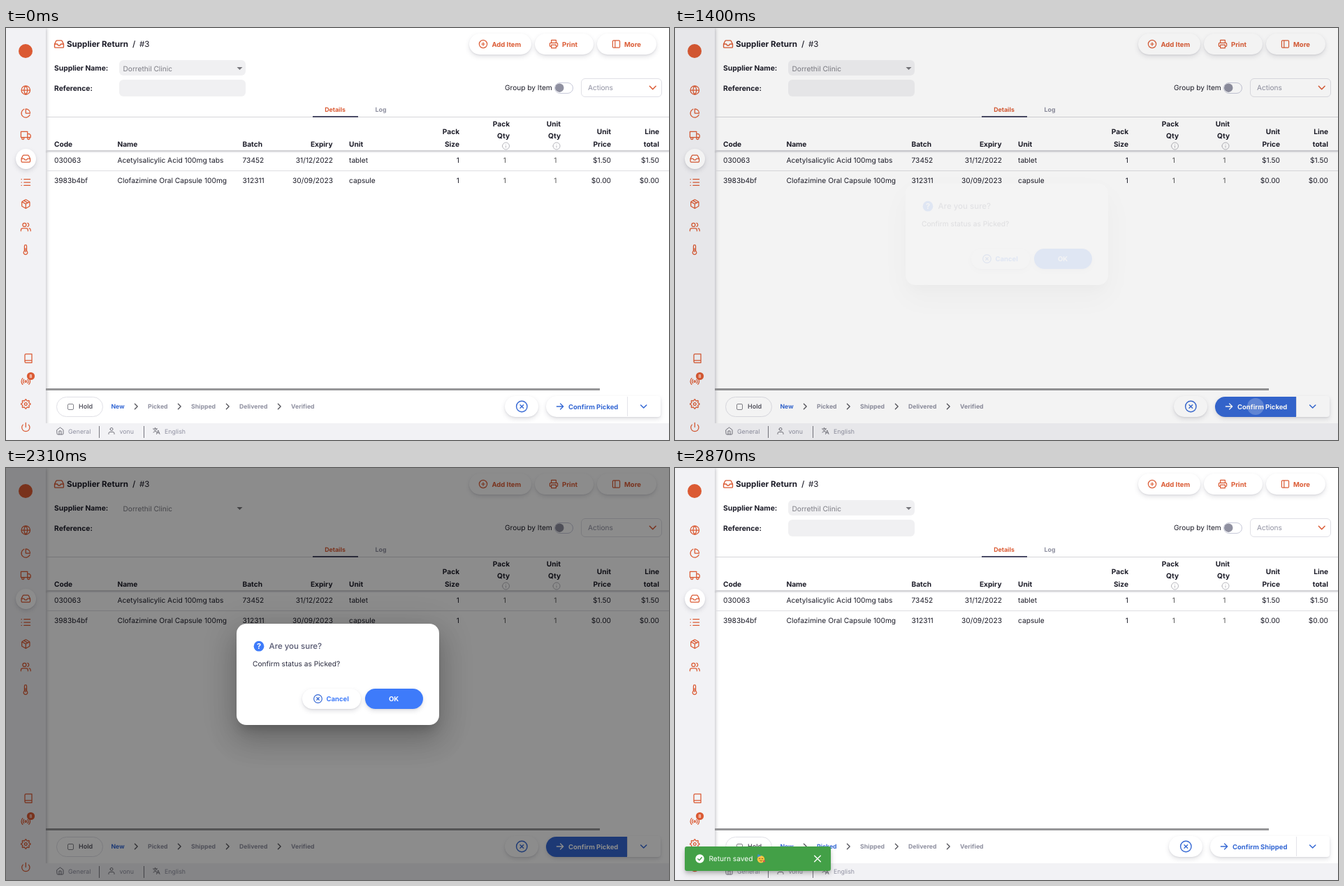
An HTML page that plays this animation: 949x590 px, repeating every 3430 ms.

```html
<!DOCTYPE html>
<html lang="en">
<head>
<meta charset="utf-8">
<title>Supplier Return</title>
<style>
  html, body { margin: 0; width: 100%; height: 100%; overflow: hidden; background: #fff; }
  #stage { position: relative; width: 949px; height: 590px; overflow: hidden; }
  .layer, .layer > svg { position: absolute; left: 0; top: 0; width: 949px; height: 590px; }
  .layer div { position: absolute; box-sizing: border-box; }
  text { font-family: Inter, "Open Sans", sans-serif; fill: currentColor; text-rendering: geometricPrecision; white-space: pre; }
  .icon { fill: none; stroke: currentColor; stroke-linecap: round; stroke-linejoin: round; }
  .pill { background: #fff; border-radius: 15px; box-shadow: 0 1px 2px rgba(40,41,61,.08), 0 3px 6px rgba(96,97,112,.18); }
  .paper { background: #fff; border-radius: 14px; box-shadow: 0 11px 15px -7px rgba(0,0,0,.2), 0 24px 38px 3px rgba(0,0,0,.14), 0 9px 46px 8px rgba(0,0,0,.12); }
  .field { background: #f0f0f2; border-radius: 6px; }
  .fill { background: #3568d4; overflow: hidden; }
  .ripple { border-radius: 50%; background: rgba(255,255,255,.24); }
  .toast { background: #43a047; border-radius: 3px; box-shadow: 0 3px 5px -1px rgba(0,0,0,.2), 0 5px 9px rgba(0,0,0,.14); }
</style>
</head>
<body>
<div id="stage"></div>
<script>
const ORANGE = '#db5a33', BLUE = '#3568d4', BRIGHT = '#3e7bfa', GREY = '#8f90a0', INK = '#1c1c28';
const LOOP = 3430, STEP = 70;
const stage = document.getElementById('stage');

const ring = (x, y, r) => `M${x - r} ${y}a${r} ${r} 0 1 0 ${2 * r} 0a${r} ${r} 0 1 0 ${-2 * r} 0`;

function gear() {
  const pts = [];
  for (let i = 0; i < 32; i++) {
    const a = (i - .5) * Math.PI / 16, r = i % 4 < 2 ? 10.6 : 8;
    pts.push((12 + r * Math.sin(a)).toFixed(2) + ' ' + (12 - r * Math.cos(a)).toFixed(2));
  }
  return 'M' + pts.join('L') + 'Z' + ring(12, 12, 3);
}

const ICONS = {
  globe: ring(12, 12, 10) + 'M2 12h20M12 2a15.3 15.3 0 0 1 4 10 15.3 15.3 0 0 1-4 10 15.3 15.3 0 0 1-4-10 15.3 15.3 0 0 1 4-10z',
  pie: 'M21.2 15.9A10 10 0 1 1 8 2.8M22 12A10 10 0 0 0 12 2v10z',
  truck: 'M1 3h15v13H1zM16 8h4l3 3v5h-7z' + ring(5.5, 18.5, 2.5) + ring(18.5, 18.5, 2.5),
  inbox: 'M22 12h-6l-2 3h-4l-2-3H2M5.5 5.1L2 12v6a2 2 0 0 0 2 2h16a2 2 0 0 0 2-2v-6l-3.5-6.9A2 2 0 0 0 16.8 4H7.2a2 2 0 0 0-1.7 1.1z',
  list: 'M8 5h14M8 12h14M8 19h14M2 5h.5M2 12h.5M2 19h.5',
  box: 'M16.5 9.4l-9-5.2M21 16V8a2 2 0 0 0-1-1.7l-7-4a2 2 0 0 0-2 0l-7 4A2 2 0 0 0 3 8v8a2 2 0 0 0 1 1.7l7 4a2 2 0 0 0 2 0l7-4a2 2 0 0 0 1-1.7zM3.3 7l8.7 5 8.7-5M12 22V12',
  users: 'M17 21v-2a4 4 0 0 0-4-4H5a4 4 0 0 0-4 4v2M23 21v-2a4 4 0 0 0-3-3.9M16 3.1a4 4 0 0 1 0 7.8' + ring(9, 7, 4),
  thermo: 'M14 14.8V3.5a2.5 2.5 0 0 0-5 0v11.3a4.5 4.5 0 1 0 5 0zM11.5 9v8',
  book: 'M4 19.5A2.5 2.5 0 0 1 6.5 17H20M6.5 2H20v20H6.5A2.5 2.5 0 0 1 4 19.5v-15A2.5 2.5 0 0 1 6.5 2z',
  radio: ring(12, 12, 2) + 'M16.2 7.8a6 6 0 0 1 0 8.5M7.8 16.2a6 6 0 0 1 0-8.5M19.1 4.9a10 10 0 0 1 0 14.1M4.9 19.1a10 10 0 0 1 0-14.1',
  gear: gear(),
  power: 'M18.4 6.6a9 9 0 1 1-12.7 0M12 2v10',
  plus: ring(12, 12, 10) + 'M12 8v8M8 12h8',
  printer: 'M6 9V2h12v7M6 18H4a2 2 0 0 1-2-2v-5a2 2 0 0 1 2-2h16a2 2 0 0 1 2 2v5a2 2 0 0 1-2 2h-2M6 14h12v8H6z',
  panel: 'M5 3h14a2 2 0 0 1 2 2v14a2 2 0 0 1-2 2H5a2 2 0 0 1-2-2V5a2 2 0 0 1 2-2zM9 3v18',
  cancel: ring(12, 12, 10) + 'M15 9l-6 6M9 9l6 6',
  arrow: 'M4 12h16M13 5l7 7-7 7',
  down: 'M5 8.5l7 7 7-7',
  next: 'M9 5l7 7-7 7',
  info: ring(12, 12, 10) + 'M12 16v-4M12 8h.01',
  home: 'M3 9l9-7 9 7v11a2 2 0 0 1-2 2H5a2 2 0 0 1-2-2zM9 22V12h6v10',
  user: 'M20 21v-2a4 4 0 0 0-4-4H8a4 4 0 0 0-4 4v2' + ring(12, 7, 4),
  translate: 'M2 6h12M8 3v3M12 6c-1 5-4 8-9 10M5 9c1 3 4 5 7 6M12 21l4.5-11L21 21M13.5 17.5h6',
  close: 'M4 4l16 16M20 4L4 20',
  check: 'M6.5 12.5l4 4 7-8'
};

function svgEl(parent, tag, attrs) {
  const e = document.createElementNS('http://www.w3.org/2000/svg', tag);
  for (const k in attrs) e.setAttribute(k, attrs[k]);
  return parent.appendChild(e);
}

function layer(parent) {
  const el = document.createElement('div');
  el.className = 'layer';
  parent.appendChild(el);
  return { el, svg: svgEl(el, 'svg', { viewBox: '0 0 949 590' }) };
}

// Boxes always sit beneath the layer's drawing.
function box(l, x, y, w, h, cls, css = '') {
  const d = document.createElement('div');
  d.className = cls;
  d.style.cssText = `left:${x}px;top:${y}px;width:${w}px;height:${h}px;${css}`;
  l.el.insertBefore(d, l.svg);
  return d;
}

function text(g, x, y, str, color, size = 10.15, weight = 400, anchor = 'start') {
  const t = svgEl(g, 'text', { x, y, 'font-size': size, 'font-weight': weight, 'text-anchor': anchor });
  if (color) t.style.color = color;
  t.textContent = str;
  return t;
}

function icon(g, name, x, y, size, color, width = 1.25) {
  const k = size / 24;
  const p = svgEl(g, 'path', {
    class: 'icon', d: ICONS[name], 'stroke-width': width / k,
    transform: `translate(${x - size / 2} ${y - size / 2}) scale(${k})`
  });
  if (color) p.style.color = color;
  return p;
}

const dot = (g, cx, cy, r, fill) => svgEl(g, 'circle', { cx, cy, r, fill });

/* Page */
const page = layer(stage), P = page.svg;

function sidebar() {
  box(page, 0, 0, 57, 590, '', 'background:#f2f2f5;box-shadow:1px 0 5px rgba(40,41,61,.3)');
  box(page, 13.5, 172.5, 29, 29, 'pill');
  dot(P, 28, 33, 10, ORANGE);
  const items = { globe: 89, pie: 122, truck: 154, inbox: 187, list: 221, box: 252, users: 285, thermo: 317.5, radio: 506, gear: 538.5, power: 571.5 };
  for (const n in items) icon(P, n, 28.3, items[n], 15, ORANGE);
  icon(P, 'book', 32, 473, 15, ORANGE);
  dot(P, 35.5, 498.5, 5.6, ORANGE);
  text(P, 35.5, 501, '8', '#fff', 6.8, 500, 'middle');
}

function toolbar() {
  icon(P, 'inbox', 76, 23, 15.5, ORANGE, 1.4);
  text(P, 87, 27, 'Supplier Return', INK, 11.6, 700);
  text(P, 181, 27, '/', INK, 11.6, 500);
  text(P, 191, 27, '#3', INK, 11.6);
  [['plus', 'Add Item', 663, 89, 683, 695.5], ['printer', 'Print', 757, 84, 784, 796], ['panel', 'More', 846, 85, 873.5, 885]]
    .forEach(([n, label, x, w, ix, tx]) => {
      box(page, x, 8, w, 30, 'pill');
      icon(P, n, ix, 23, 13.5, ORANGE, 1.2);
      text(P, tx, 26.7, label, ORANGE, 9.5, 700);
    });
  text(P, 69, 61, 'Supplier Name:', INK, 10.3, 700);
  text(P, 69, 90, 'Reference:', INK, 10.3, 700);
  box(page, 162, 46, 181, 22, 'field');
  box(page, 162, 74, 181, 24, 'field');
  text(P, 167.5, 62, 'Dorrethil Clinic', '#7c7c84');
  svgEl(P, 'path', { d: 'M330.5 56h8l-4 4z', fill: '#77777c' });
  text(P, 714, 89.2, 'Group by Item', INK);
  box(page, 785, 78, 27, 15.5, '', 'background:#fff;border:1px solid #c7c9d9;border-radius:8px');
  dot(P, 792.3, 85.7, 6.2, GREY);
  box(page, 823, 72, 116, 26.5, '', 'border:1px solid #e0e0e6;border-radius:6px');
  text(P, 833, 89.2, 'Actions', GREY);
  icon(P, 'down', 925.7, 85.5, 15, ORANGE, 1.5);
  text(P, 471, 120, 'Details', ORANGE, 8.8, 700, 'middle');
  text(P, 536.5, 120, 'Log', GREY, 8.8, 700, 'middle');
  box(page, 57, 127, 892, 1, '', 'background:#d6d6da');
  box(page, 439, 126, 65, 2, '', 'background:#4b4c66');
}

function table() {
  const head = (x, y, s, a) => text(P, x, y, s, INK, 10.15, 700, a);
  head(69, 169.7, 'Code');
  head(159.5, 169.7, 'Name');
  head(338.5, 169.7, 'Batch');
  head(467.5, 169.7, 'Expiry', 'end');
  head(491, 169.7, 'Unit');
  [[649, 152.2, 'Pack', 'Size'], [721, 140.6, 'Pack', 'Qty'], [794, 140.6, 'Unit', 'Qty'], [866, 152.2, 'Unit', 'Price'], [935, 152.2, 'Line', 'total']]
    .forEach(([x, y, a, b]) => { head(x, y, a, 'end'); head(x, y + 17.5, b, 'end'); });
  icon(P, 'info', 715.5, 169, 12, '#a5a5ad', .8);
  icon(P, 'info', 788, 169, 12, '#a5a5ad', .8);
  box(page, 57, 175, 892, 1.5, '', 'background:#d2d2d6;box-shadow:0 1px 2px rgba(40,41,61,.14)');
  box(page, 57, 203.5, 892, 1, '', 'background:#dedee2');
  const cols = [69, 159.5, 338.5, 468, 491, 649, 716, 788.5, 866, 935];
  [['030063', 'Acetylsalicylic Acid 100mg tabs', '73452', '31/12/2022', 'tablet', 1, 1, 1, '$1.50', '$1.50'],
   ['3983b4bf', 'Clofazimine Oral Capsule 100mg', '312311', '30/09/2023', 'capsule', 1, 1, 1, '$0.00', '$0.00']]
    .forEach((row, r) => row.forEach((s, c) =>
      text(P, cols[c], 193 + r * 29, s, c === 6 || c === 7 ? '#555' : INK, 10.2, 400, c === 3 || c > 4 ? 'end' : 'start')));
  box(page, 57, 516, 793, 2.6, '', 'background:#969698');
}

let pickedStep;
function footer() {
  box(page, 72, 528, 67, 29, '', 'background:#fff;border:1px solid #e0e0e6;border-radius:15px');
  box(page, 87.5, 537.5, 9, 9, '', 'border:1px solid #85858c;border-radius:2px');
  text(P, 104, 545.2, 'Hold', '#555560', 9, 600);
  const steps = [['New', 150.5], ['Picked', 203], ['Shipped', 265], ['Delivered', 334], ['Verified', 408]]
    .map(([s, x], i) => text(P, x, 545.2, s, i ? GREY : BLUE, 8.7, 700));
  pickedStep = steps[1];
  [186, 248, 317, 391].forEach(x => icon(P, 'next', x, 542, 13, '#55555c', 1.3));
  box(page, 57, 566, 892, 24, '', 'background:#f2f2f5');
  [['home', 'General', 77.5, 89], ['user', 'vonu', 151, 162.5], ['translate', 'English', 215.5, 227]]
    .forEach(([n, s, ix, tx]) => {
      icon(P, n, ix, 577, 12, '#73737c', 1);
      text(P, tx, 581, s, GREY, 8.8);
    });
  [133, 197].forEach(x => box(page, x, 570, 1, 17, '', 'background:#77777f'));
}

function ripple(parent, cx, cy) {
  const r = document.createElement('div');
  r.className = 'ripple';
  parent.appendChild(r);
  return age => {
    const radius = age < 70 ? 12 : age < 140 ? 29 : 46;
    const alpha = age < 0 ? 0 : Math.max(0, 1 - Math.max(0, age - 140) / 420);
    r.style.cssText = `left:${cx - radius}px;top:${cy - radius}px;width:${2 * radius}px;height:${2 * radius}px;opacity:${alpha}`;
  };
}

function actions(label, left) {
  const l = layer(page.el), w = 889 - left;
  box(l, left - 59, 527, 48, 30, 'pill');
  icon(l.svg, 'cancel', left - 34.7, 542, 18.5, BLUE, 1.4);
  box(l, left, 527, 937 - left, 30, 'pill', 'border-radius:15px 4px 4px 15px');
  const fill = box(l, left, 527.5, w, 29.5, 'fill', 'border-radius:15px 0 0 15px');
  box(l, 888.5, 528, 1, 28, '', 'background:#e4e4ea');
  const g = svgEl(l.svg, 'g', {});
  icon(g, 'arrow', left + 20, 542, 14, null, 1.3);
  text(g, left + 32, 545.5, label, null, 9.5, 700);
  icon(l.svg, 'down', 912.7, 542, 14, BLUE, 1.5);
  const wave = ripple(fill, 831 - left, 14.5);
  return {
    show(on) { l.el.style.display = on ? '' : 'none'; },
    hot(on, age) {
      fill.style.display = on ? '' : 'none';
      g.style.color = on ? '#fff' : BLUE;
      wave(age);
    }
  };
}

sidebar();
toolbar();
table();
footer();
const confirmPicked = actions('Confirm Picked', 773);
const confirmShipped = actions('Confirm Shipped', 766);
const fields = page.el.querySelectorAll('.field');

/* Dialog */
const backdrop = layer(stage);
backdrop.el.style.background = 'rgba(0,0,0,.45)';
const dialog = layer(stage), D = dialog.svg;
box(dialog, 330, 223, 290, 145, 'paper');
dot(D, 362, 255.2, 7.4, BRIGHT);
text(D, 362, 259.3, '?', '#fff', 11, 700, 'middle');
text(D, 376.5, 259.4, 'Are you sure?', '#555770', 11.5, 500);
text(D, 353, 283.5, 'Confirm status as Picked?', '#28293d', 10.2);
box(dialog, 424, 316, 84, 29, 'pill');
icon(D, 'cancel', 446.5, 330.5, 14, BLUE, 1.2);
text(D, 458.5, 334, 'Cancel', BRIGHT, 9.5, 700);
box(dialog, 514, 316, 83, 29, 'pill');
const okFill = box(dialog, 514, 316, 83, 29, 'fill', `border-radius:15px;background:${BRIGHT}`);
const okWave = ripple(okFill, 41, 14.5);
const okText = text(D, 555, 334, 'OK', null, 9.5, 700, 'middle');

/* Toast */
const toast = layer(stage), T = toast.svg;
box(toast, 14, 542, 209, 35, 'toast');
dot(T, 35.5, 559.5, 6.2, '#fff');
icon(T, 'check', 35.5, 559.5, 12, '#43a047', 1.4);
text(T, 48.5, 563.2, 'Return saved', '#fff');
dot(T, 123, 560.3, 5.2, '#f6c544');
svgEl(T, 'path', { d: 'M117.5 557.5l1.2-4.5 4.8 2.2z', fill: '#3f8fd0' });
svgEl(T, 'path', { d: 'M120.2 559.5q1-1.2 2 0M124 559.5q1-1.2 2 0M121.5 562.2q1.8 1.8 3.4 0', class: 'icon', style: 'color:#6b4318', 'stroke-width': .8 });
dot(T, 127.5, 563, 1.6, '#d9534f');
icon(T, 'close', 204, 559.5, 13, '#fff', 1.4);

/* Motion: [time, value], each value held until the next */
const FADE = [[0, 0], [1400, .1], [1470, .5], [1540, 1], [2660, .88], [2730, .34], [2800, .05], [2870, 0]];
const SLIDE = [[0, -240], [2660, -223], [2730, -65], [2800, -12], [2870, 0]];
const PRESS = 1400, OK_PRESS = 2380, SAVED = 2660;

const held = (track, t) => track.reduce((v, [at, next]) => t >= at ? next : v, 0);

function draw(t) {
  const fade = held(FADE, t), saved = t >= SAVED;
  backdrop.el.style.opacity = dialog.el.style.opacity = fade;
  fields.forEach(f => f.style.opacity = fade > .8 ? 0 : 1);
  toast.el.style.transform = `translateX(${held(SLIDE, t)}px)`;
  pickedStep.style.color = saved ? BLUE : GREY;
  confirmPicked.show(!saved);
  confirmShipped.show(saved);
  confirmPicked.hot(t >= PRESS, t - PRESS);
  confirmShipped.hot(false, -1);
  okFill.style.display = saved ? 'none' : '';
  okText.style.color = saved ? BRIGHT : '#fff';
  okWave(t - OK_PRESS);
}

const start = performance.now();
function tick() {
  const t = (performance.now() - start) % LOOP;
  draw(Math.floor(t / STEP) * STEP);
  requestAnimationFrame(tick);
}
tick();
</script>
</body>
</html>
```
